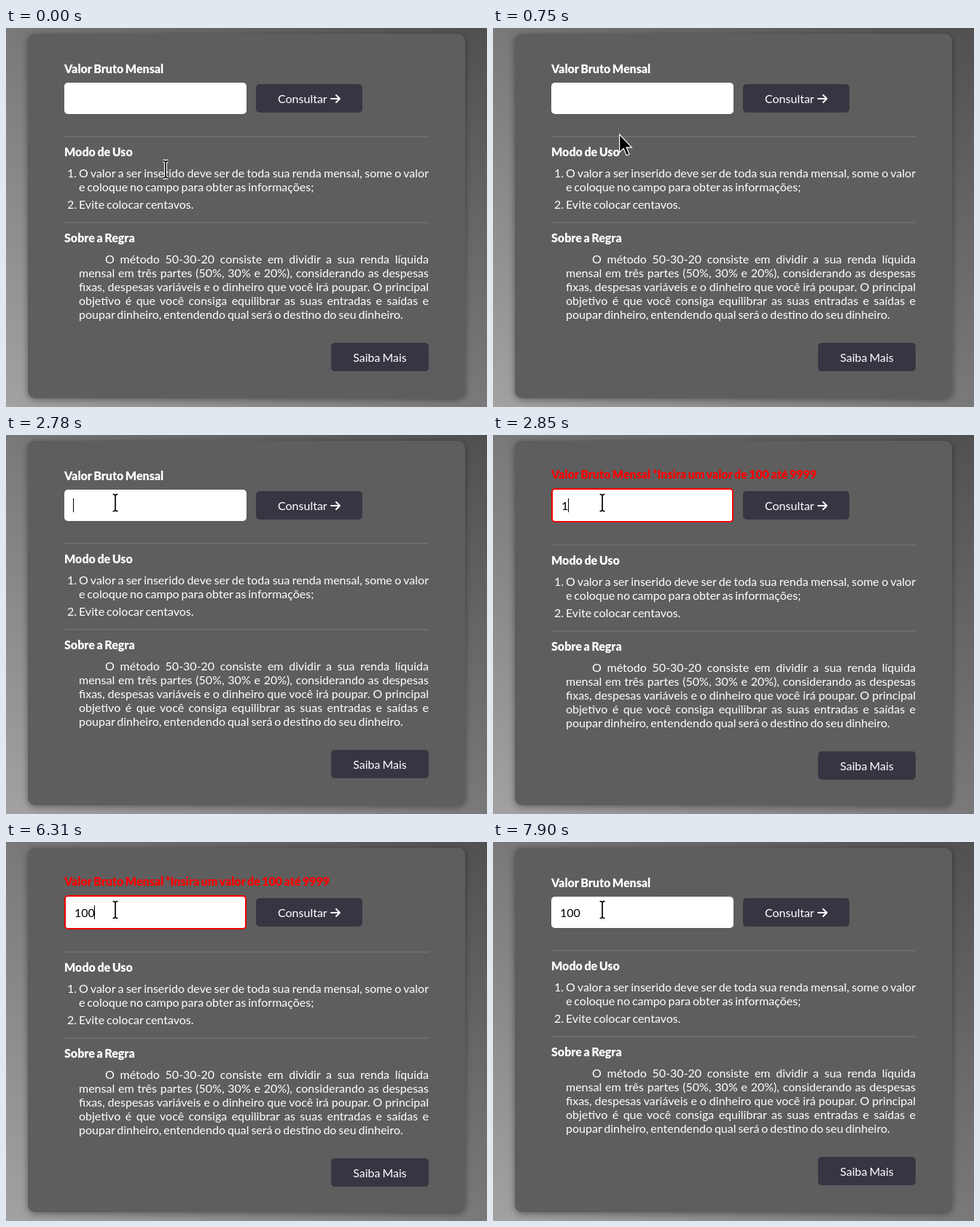
Recreate the animation shown at these times as an HTML page. Size 660 by 520 pixels, loop 8000 ms.

```html
<!DOCTYPE html>
<html lang="pt-BR">
<head>
<meta charset="utf-8">
<title>Regra 50-30-20</title>
<style>
* { box-sizing: border-box; margin: 0; padding: 0; }
html, body { width: 100%; height: 100%; overflow: hidden; }
body {
  position: relative;
  font: 16px/19px Lato, sans-serif;
  word-spacing: -1.2px;
  color: #fff;
  background: linear-gradient(to top right, #a2a2a2, #505050);
}
body * { animation: 8s step-end infinite; }

.card {
  position: absolute; left: 30px; top: 8px; width: 600px; height: 500px;
  border-radius: 10px;
  background: #5e5e5e;
  box-shadow: 0 2px 10px rgba(0, 0, 0, .4);
}

/* --e is 1 while the value is out of range */
.form { --e: 0; position: absolute; left: 80px; top: 0; width: 500px; animation-name: error; }
@keyframes error {
  0% { --e: 0; }
  35.625% { --e: 1; }
  79.75%, 100% { --e: 0; }
}
.form > * { position: absolute; }
.label, h2 { left: 0; font: 900 16px/19px Lato, sans-serif; white-space: nowrap; }
.label {
  top: calc(46px - 2px * var(--e));
  color: rgb(255, calc(255 - 255 * var(--e)), calc(255 - 255 * var(--e)));
}
.hint { opacity: var(--e); }

.field {
  display: flex;
  left: 0; top: calc(75px - 2px * var(--e)); width: 250px;
  padding: 12px;
  border: calc(2px * var(--e)) solid #f00;
  border-radius: 5px;
  background: #fff; color: #000;
}
.value { width: 0; height: 19px; overflow: hidden; animation-name: type; }
@keyframes type {
  0% { width: 0; }
  35.625% { width: 1ch; }
  62.25% { width: 2ch; }
  78.875%, 100% { width: 3ch; }
}
.caret { width: 1px; height: 19px; margin-left: -.35px; background: #000; opacity: 0; animation-name: blink; }
@keyframes blink {
  0%, 28.125%, 41.625%, 54%, 68.875%, 85.5%, 98.75%, 100% { opacity: 0; }
  21.375%, 34.75%, 47.375%, 60.625%, 75.5%, 92.125% { opacity: 1; }
}

.button { position: absolute; height: 39px; padding: 10px 30px; border-radius: 5px; background: #383543; white-space: nowrap; }
.query { left: 263px; top: 77px; width: 146px; }
.query svg { position: absolute; right: 30px; top: 13px; }
.more { left: 366px; top: 432px; width: 134px; text-align: center; }

.info { left: 0; top: calc(2px * var(--e)); width: 500px; }
.info > * { position: absolute; }
hr { left: 0; width: 500px; height: 2px; border: 0; background: #6d6d6d; }
ol, p { left: 20px; width: 480px; text-align: justify; }
ol { top: 189px; }
li + li { margin-top: 5px; }
p { top: 307px; text-indent: 36px; }

.pointer { position: absolute; left: 0; top: 0; overflow: visible; animation-name: move; }
@keyframes move {
  0% { transform: translate(219px, 194px); animation-timing-function: steps(4); }
  3.375% { transform: translate(206px, 182px); animation-timing-function: steps(7); }
  9.375% { transform: translate(173px, 145px); animation-timing-function: steps(1); }
  10.125% { transform: translate(167px, 142px); animation-timing-function: steps(5); }
  14.375% { transform: translate(148px, 112px); animation-timing-function: steps(3); }
  16.875% { transform: translate(143px, 95px); animation-timing-function: steps(2); }
  18.875%, 100% { transform: translate(150px, 93px); }
}
.arrow { opacity: 0; animation-name: arrow; }
.beam { animation-name: beam; }
@keyframes arrow {
  0%, 14.375%, 100% { opacity: 0; }
  3.375% { opacity: 1; }
}
@keyframes beam {
  0%, 14.375%, 100% { opacity: 1; }
  3.375% { opacity: 0; }
}
</style>
</head>
<body>
<div class="card"></div>

<div class="form">
  <div class="label">Valor Bruto Mensal <span class="hint">*Insira um valor de 100 até 9999</span></div>
  <div class="field"><span class="value">100</span><i class="caret"></i></div>
  <div class="button query">Consultar
    <svg width="14" height="14" fill="none" stroke="#fff" stroke-width="2" stroke-linecap="round" stroke-linejoin="round">
      <path d="M1 7H13M8 2L13 7L8 12"/>
    </svg>
  </div>

  <div class="info">
    <hr style="top:148px">
    <h2 style="top:160px">Modo de Uso</h2>
    <ol>
      <li>O valor a ser inserido deve ser de toda sua renda mensal, some o valor e coloque no campo para obter as informações;</li>
      <li>Evite colocar centavos.</li>
    </ol>
    <hr style="top:266px">
    <h2 style="top:278px">Sobre a Regra</h2>
    <p>O método 50-30-20 consiste em dividir a sua renda líquida mensal em três partes (50%, 30% e 20%), considerando as despesas fixas, despesas variáveis e o dinheiro que você irá poupar. O principal objetivo é que você consiga equilibrar as suas entradas e saídas e poupar dinheiro, entendendo qual será o destino do seu dinheiro.</p>
    <div class="button more">Saiba Mais</div>
  </div>
</div>

<svg class="pointer" width="1" height="1">
  <defs>
    <path id="ibeam" d="M-3.5-11.5H-1.5L0-10.2L1.5-11.5H3.5M0-10.2V10.2M-3.5 11.5H-1.5L0 10.2L1.5 11.5H3.5"/>
  </defs>
  <path class="arrow" fill="#000" stroke="#fff" stroke-width="1.2"
    d="M.6 1V25.5L6.2 20.2L10.2 29.8L14 28.2L10 18.8H17.4Z"/>
  <g class="beam" fill="none">
    <use href="#ibeam" stroke="#fff" stroke-width="4"/>
    <use href="#ibeam" stroke="#000" stroke-width="1.7"/>
  </g>
</svg>
</body>
</html>
```
